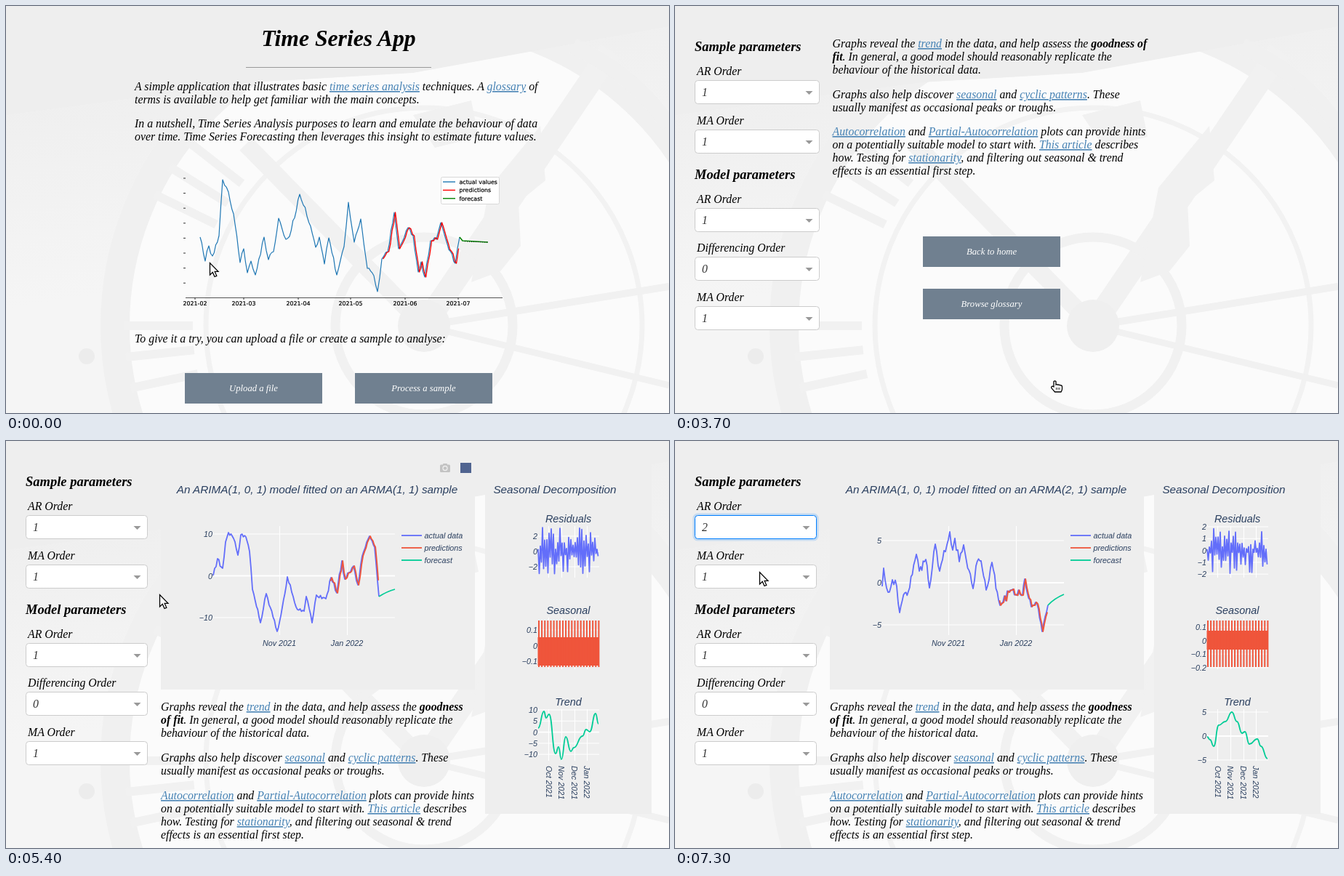
These frames come from a looping animation (912 by 560 pixels, 8 s). An HTML page:

```html
<!DOCTYPE html>
<html lang="en">
<head>
<meta charset="utf-8">
<title>Time Series App</title>
<style>
html, body { margin: 0; width: 100%; height: 100%; overflow: hidden; background: #f8f8f8; }
svg { display: block; width: 912px; height: 560px; font: italic 15.84px "Liberation Serif", serif; }
.title { font-size: 31.68px; font-weight: bold; }
.head { font-size: 18.53px; font-weight: bold; }
.link { fill: #4682b4; text-decoration: underline; }
.bold { font-weight: bold; }
.button { font-size: 12.7px; fill: #fff; }
.value { fill: #333; }
.mid { text-anchor: middle; }
.end { text-anchor: end; }
.plot { font: italic 10.8px "Liberation Sans", sans-serif; fill: #2a3f5f; }
.big { font-size: 15.3px; }
.sub { font-size: 14.4px; }
.mpl { font: 7.9px "DejaVu Sans", sans-serif; stroke: #000; stroke-width: .2px; }
polyline { fill: none; stroke-linejoin: round; }
</style>
</head>
<body>
<svg id="stage" viewBox="0 0 912 560"></svg>
<script>
const LOOP = 8000;
const BLUE = '#636efa', RED = '#ef553b', GREEN = '#00cc96';
const stage = document.getElementById('stage');

// Markup: [link] and *bold*
const rich = s => s.replace(/&/g, '&amp;')
  .replace(/\[(.+?)\]/g, '<tspan class="link">$1</tspan>')
  .replace(/\*(.+?)\*/g, '<tspan class="bold">$1</tspan>');
const text = (x, y, s, cls = '', extra = '') => `<text x="${x}" y="${y}" class="${cls}" ${extra}>${rich(s)}</text>`;
const lines = (x, y, rows) => rows.map((s, i) => text(x, y + 18 * i, s)).join('');
const rect = (x, y, w, h, fill, extra = '') => `<rect x="${x}" y="${y}" width="${w}" height="${h}" fill="${fill}" ${extra}/>`;
const path = (d, stroke, width = 1, extra = '') => `<path d="${d}" fill="none" stroke="${stroke}" stroke-width="${width}" ${extra}/>`;
const shape = (d, fill, extra = '') => `<path d="${d}" fill="${fill}" ${extra}/>`;
const group = (id, body, cls = '') => `<g id="${id}" class="${cls}">${body}</g>`;
const button = (x, y, label) => rect(x, y, 189, 42, '#708090') + text(x + 94.5, y + 25, label, 'button mid');

function random(seed) {
  return () => (seed = seed * 16807 % 2147483647) / 2147483647;
}

// Turning points written as "x,y x,y"
const turns = s => s.split(' ').map(p => p.split(',').map(Number));

// Joins turning points in small steps, with a wobble that fades out at each of them
function series(keys, step, wobble, seed = 1) {
  const rnd = random(seed * 7919), pts = turns(keys), out = [pts[0]];
  for (let i = 1; i < pts.length; i++) {
    const [x0, y0] = pts[i - 1], [x1, y1] = pts[i];
    const n = Math.max(1, Math.round((x1 - x0) / step));
    for (let j = 1; j <= n; j++) {
      const k = j / n, noise = wobble * (2 * rnd() - 1) * Math.sin(Math.PI * k);
      out.push([x0 + (x1 - x0) * k, y0 + (y1 - y0) * k + noise]);
    }
  }
  return out;
}

// A prediction trails the data by one step
const lagged = (pts, from, step) => pts.filter(p => p[0] >= from).slice(0, -1).map(([x, y]) => [x + step, y]);

const trace = (pts, color, width = 1.8) =>
  `<polyline points="${pts.map(p => p.map(v => v.toFixed(1))).join(' ')}" stroke="${color}" stroke-width="${width}"/>`;

function smooth(keys, color) {
  const pts = turns(keys);
  return path(pts.map(([x, y], i) => {
    if (!i) return `M${x} ${y}`;
    const [px, py] = pts[i - 1], mx = (px + x) / 2;
    return `C${mx} ${py} ${mx} ${y} ${x} ${y}`;
  }).join(''), color, 1.8);
}

function background() {
  const [cx, cy] = [575, 440];
  const ray = (deg, r) => {
    const a = deg * Math.PI / 180;
    return `${cx + r * Math.cos(a)} ${cy + r * Math.sin(a)}`;
  };
  const spoke = (x, y, w) => path(`M${cx} ${cy}L${x} ${y}`, '#f1f1f1', w);
  const ring = (r, color, w, fill = 'none') => `<circle cx="${cx}" cy="${cy}" r="${r}" fill="${fill}" stroke="${color}" stroke-width="${w}"/>`;
  let numerals = '';
  for (const middle of [174, 212])
    for (const turn of [-6, 0, 6]) numerals += path(`M${ray(middle + turn, 318)}L${ray(middle + turn, 412)}`, '#f1f1f1', 12);
  return `<defs><linearGradient id="sky" x2=".25" y2="1">
      <stop offset=".15" stop-color="#eee"/><stop offset=".7" stop-color="#f5f5f5"/></linearGradient></defs>`
    + rect(0, 0, 912, 560, 'url(#sky)')
    + ring(425, '#f0f0f0', 40, '#fbfbfb') + ring(300, '#f2f2f2', 7)
    + shape('M0 0H912V28L560 92 340 105 0 150Z', '#eee')
    + numerals
    + spoke(832, 62, 32) + spoke(330, 190, 24) + spoke(912, 386, 10) + spoke(912, 522, 9)
    + ring(122, '#f1f1f1', 13) + ring(36, '#efefef', 0, '#efefef')
    + shape('M560 150L640 130 650 180 590 195ZM665 250L735 165 742 240 705 270 708 330 680 365 640 380Z', '#f1f1f1')
    + path('M780 55Q865 95 912 165', '#f0f0f0', 22)
    + '<circle cx="111" cy="482" r="11" fill="#ececec"/>';
}

function homeChart() {
  const step = 2.42;
  const data = series('267,318 274,351 279,330 284,344 293,316 298,239 306,256 313,286 322,353 327,334 332,367 337,351 343,370 '
    + '355,318 361,349 368,338 375,292 385,321 390,317 404,259 419,303 426,332 431,318 438,355 444,319 455,370 465,331 '
    + '471,270 479,325 488,293 497,361 506,371 511,393 517,348 525,338 534,284 540,334 553,305 560,316 567,366 571,352 '
    + '576,373 584,323 592,321 598,298 609,335 618,354 624,318', step, 4);
  const ticks = [260, 327, 402, 474, 549, 622];
  const key = [['actual values', '#1f77b4'], ['predictions', '#f00'], ['forecast', '#008000']];
  let s = path('M247 401.5H683', '#555');
  for (let i = 0; i < 8; i++) s += path(`M244 ${237 + i * 20.6}h3`, '#333');
  ticks.forEach((x, i) => s += path(`M${x} 401v3`, '#333') + text(x, 412, `2021-0${i + 2}`, 'mpl mid'));
  s += trace(data, '#1f77b4', 1.2) + trace(lagged(data, 517, 1.6), '#f00', 1.3)
    + path('M624 318L628 323 663 325', '#008000', 1.5) + path('M631 324L663 325', '#222', 1, 'stroke-dasharray="1 2"')
    + rect(598.5, 235.5, 80, 37, '#fff', 'rx="2" stroke="#d8d8d8"');
  key.forEach(([label, color], i) => {
    const y = 242 + i * 11.4;
    s += path(`M601 ${y}h17`, color, 1.4) + text(623.5, y + 3, label, 'mpl');
  });
  return s;
}

function home() {
  return text(457.5, 55, 'Time Series App', 'title mid')
    + path('M330 84.5H585', '#999')
    + lines(177, 116, ['A simple application that illustrates basic [time series analysis] techniques. A [glossary] of',
      'terms is available to help get familiar with the main concepts.'])
    + lines(177, 167, ['In a nutshell, Time Series Analysis purposes to learn and emulate the behaviour of data',
      'over time. Time Series Forecasting then leverages this insight to estimate future values.'])
    + homeChart()
    + text(177, 463, 'To give it a try, you can upload a file or create a sample to analyse:')
    + button(246, 505, 'Upload a file') + button(480, 505, 'Process a sample');
}

const caret = (x, y, up) => shape(`M${x} ${y}h10l-5 ${up ? -5 : 5}z`, '#999');

function form(width) {
  const fields = [['AR Order', 1], ['MA Order', 1], ['AR Order', 1], ['Differencing Order', 0], ['MA Order', 1]];
  return text(27, 62, 'Sample parameters', 'head') + text(27, 238, 'Model parameters', 'head')
    + fields.map(([label, value], i) => {
      const y = Math.round(102 + 67.8 * i + (i > 1 ? 40 : 0)) + .5;
      return text(30, y - 7.5, label) + rect(27.5, y, width, 32, '#fff', 'rx="4" stroke="#ccc"')
        + text(37, y + 21.5, `${value}`, 'value') + caret(width + 8.5, y + 14.5);
    }).join('');
}

const notes = (x, tops, first) => lines(x, tops[0], first)
  + lines(x, tops[1], ['Graphs also help discover [seasonal] and [cyclic patterns]. These', 'usually manifest as occasional peaks or troughs.'])
  + lines(x, tops[2], ['[Autocorrelation] and [Partial-Autocorrelation] plots can provide hints',
    'on a potentially suitable model to start with. [This article] describes',
    'how. Testing for [stationarity], and filtering out seasonal & trend', 'effects is an essential first step.']);

// Evenly spaced horizontal grid with labels
const axis = (x0, x1, top, gap, labels) => labels.map((label, i) => {
  const y = top + gap * i;
  return path(`M${x0} ${y}H${x1}`, '#fff', label === '0' ? 1.8 : 1) + text(x0 - 1, y + 4, label, 'end');
}).join('');
const columns = (xs, y0, y1) => xs.map(x => path(`M${x}.5 ${y0}V${y1}`, '#fff')).join('');

function mainChart({ order, grid, keys, wobble, forecast }) {
  const data = series(keys, 2, wobble, 3);
  const legend = [['actual data', BLUE], ['predictions', RED], ['forecast', GREEN]];
  return text(428, 72, `An ARIMA(1, 0, 1) model fitted on an ARMA(${order}, 1) sample`, 'big mid')
    + columns([376, 469], 117, 267) + axis(285, 535, ...grid)
    + text(376, 282, 'Nov 2021', 'mid') + text(469, 282, 'Jan 2022', 'mid')
    + trace(data, BLUE) + trace(lagged(data, 445, 1.2), RED) + path(forecast, GREEN, 1.8)
    + legend.map(([label, color], i) => path(`M544 ${130 + 17 * i}h28`, color, 1.8) + text(575.5, 134 + 17 * i, label)).join('');
}

function residuals(seed) {
  const rnd = random(seed), pts = [];
  for (let i = 0; i < 56; i++) pts.push([732 + i * 1.5, 151 + (i % 2 ? 1 : -1) * (2 + 30 * rnd() ** 1.5)]);
  return trace(pts, BLUE);
}

function seasonal(bandTop, bandEnd) {
  let spikes = '';
  for (let x = 733; x < 816; x += 4.12) spikes += `M${x} 247V311`;
  return rect(731.5, bandTop, 84.5, bandEnd - bandTop, RED) + path(spikes, RED, 2);
}

function decomposition({ seed, noiseGrid, seasonGrid, band, trendGrid, trend }) {
  const xs = [746, 764, 782, 799];
  return text(755, 72, 'Seasonal Decomposition', 'big mid')
    + ['Residuals', 'Seasonal', 'Trend'].map((s, i) => text(773.5, 112 + 126 * i, s, 'sub mid')).join('')
    + [117, 243, 369].map(y => columns(xs, y, y + 71)).join('')
    + axis(732, 816, ...noiseGrid) + residuals(seed)
    + axis(732, 816, ...seasonGrid) + seasonal(...band)
    + axis(732, 816, ...trendGrid) + smooth(trend, GREEN)
    + ['Oct 2021', 'Nov 2021', 'Dec 2021', 'Jan 2022'].map((s, i) =>
      text(0, 0, s, '', `transform="translate(${742.5 + 17.6 * i} 447) rotate(90)"`)).join('');
}

const firstSample = {
  order: 1, wobble: 4, grid: [128, 57.5, ['10', '0', '−10']],
  keys: '285,185 291,162 298,175 302,139 306,126 313,134 319,157 323,129 330,132 335,152 339,204 350,250 358,210 373,262 380,229 '
    + '387,187 395,214 401,232 410,234 413,214 421,250 427,212 440,217 447,188 455,209 462,165 466,190 478,172 484,198 '
    + '490,158 500,131 507,146 513,214',
  forecast: 'M513 214Q524 207 535 204',
  seed: 4242, noiseGrid: [131, 21, ['2', '0', '−2']],
  seasonGrid: [260, 21.5, ['0.1', '0', '−0.1']], band: [270, 309],
  trendGrid: [370, 15.3, ['10', '5', '0', '−5', '−10']],
  trend: '732,395 740,372 743,381 747,376 756,430 760,421 764,438 770,407 777,427 781,422 793,406 798,397 803,400 811,375 815,389'
};
const secondSample = {
  order: 2, wobble: 7, grid: [137, 58, ['5', '0', '−5']],
  keys: '285,200 287,175 293,208 299,191 305,200 309,236 316,209 321,207 332,156 336,179 345,163 350,202 358,142 364,179 '
    + '378,125 382,150 385,134 391,166 397,143 410,203 414,172 421,165 428,205 436,167 447,226 463,205 478,212 481,190 '
    + '490,228 498,224 505,262 513,226',
  forecast: 'M513 226Q521 217 535 211',
  seed: 977, noiseGrid: [118, 16.3, ['2', '1', '0', '−1', '−2']],
  seasonGrid: [256, 18.6, ['0.1', '0', '−0.1', '−0.2']], band: [261, 287],
  trendGrid: [373, 33, ['5', '0', '−5']],
  trend: '732,407 736,411 741,420 748,391 757,386 766,373 773,386 780,402 784,400 790,417 801,410 806,420 815,437'
};

function menu() {
  return shape('M27.5 134.5V106.5q0-4 4-4H190.5q4 0 4 4V257.5q0 4-4 4H31.5q-4 0-4-4Z', '#fff', 'stroke="#c4c4c4"')
    + path('M28 134.5H194', '#e0e6ea')
    + rect(28, 135, 166, 31.5, '#e3f2ff', 'id="hover"')
    + text(37, 124, '1', 'value') + caret(175.5, 122, true)
    + [1, 2, 3, 4].map((n, i) => text(35, 156 + 31.3 * i, `${n}`, n === 1 ? 'bold' : '')).join('');
}

const focusBox = rect(26, 101, 170, 35, 'none', 'rx="5" stroke="#007eff" stroke-opacity=".18" stroke-width="3"')
  + rect(27.5, 102.5, 167, 32, '#fff', 'rx="4" stroke="#007eff"')
  + text(37, 124, '2', 'value') + caret(175.5, 117);

const modebar = rect(597, 32.5, 14, 10.5, '#c3c3c3', 'rx="1.5"') + rect(601, 31, 6, 3, '#c3c3c3', 'rx="1"')
  + '<circle cx="604" cy="37.5" r="3" fill="#c3c3c3" stroke="#eee" stroke-width="1.3"/>' + rect(625, 30, 15, 14, '#506490');

const outline = 'stroke="#000" stroke-width="1.3"';
const arrow = shape('M.5 .5V17L4.3 13.4 7 19.5 9.8 18.3 7.2 12.4H12Z', '#fff', outline);
const hand = shape('M4 9V1.7q1.5-1.7 3 0V6q1-1 2.3 .3 1-.8 2.2 .3 1-.6 2 .4 1.8-.2 2 1.5V12q0 2-1.5 4H5.5Q3 13 .8 10.6 .3 8.3 2.5 8.2Z', '#fff', outline)
  + path('M7.5 10v3M9.8 10v3M12 10v3', '#000', .8);

stage.innerHTML = background()
  + group('home', home())
  + group('plain', form(171)
    + notes(216.5, [57, 127, 178], ['Graphs reveal the [trend] in the data, and help assess the *goodness of*',
      '*fit*. In general, a good model should reasonably replicate the', 'behaviour of the historical data.'])
    + button(341, 317, 'Back to home') + button(341, 389, 'Browse glossary'))
  + group('report', rect(213, 27, 432, 315, '#eee') + rect(659, 27, 229, 486, '#eee') + form(167)
    + notes(213, [371, 441, 493], ['Graphs reveal the [trend] in the data, and help assess the *goodness*',
      '*of fit*. In general, a good model should reasonably replicate the', 'behaviour of the historical data.']))
  + group('firstMain', mainChart(firstSample), 'plot') + group('firstParts', decomposition(firstSample), 'plot')
  + group('secondMain', mainChart(secondSample), 'plot') + group('secondParts', decomposition(secondSample), 'plot')
  + group('modebar', modebar) + group('menu', menu()) + group('focus', focusBox)
  + group('arrow', arrow) + group('hand', hand);

// Visible spans in ms
const spans = {
  home: [0, 3700], plain: [3700, 4400], report: [4400, LOOP],
  firstMain: [4600, 7200], secondMain: [7200, LOOP], firstParts: [4400, 7100], secondParts: [7100, LOOP],
  modebar: [5200, 5500], menu: [6100, 6900], focus: [6900, LOOP], hand: [3400, 5000]
};
// Pointer moves: start, end, target; the pointer rests in between
const moves = [
  [1400, 2200, 433, 396], [2200, 2300, 418, 397], [2300, 2400, 441, 409], [3000, 3100, 516, 502], [3300, 3500, 517, 515],
  [4900, 5400, 211, 211], [5400, 5700, 84, 112], [5700, 5800, 100, 114], [6200, 6600, 116, 180]
];
const parts = Object.fromEntries([...Object.keys(spans), 'arrow', 'hover'].map(id => [id, document.getElementById(id)]));
const show = (id, on) => { parts[id].style.display = on ? '' : 'none'; };

function pointer(t) {
  let x = 280, y = 353;
  for (const [from, to, tx, ty] of moves) {
    const k = Math.min(1, Math.max(0, (t - from) / (to - from)));
    x += (tx - x) * k;
    y += (ty - y) * k;
  }
  return [Math.round(x), Math.round(y)];
}

function render(now) {
  const t = Math.floor(now % LOOP / 100) * 100;
  for (const [id, [from, to]] of Object.entries(spans)) show(id, t >= from && t < to);
  const [x, y] = pointer(t);
  const onLink = t >= spans.hand[0] && t < spans.hand[1];
  show('arrow', !onLink);
  parts[onLink ? 'hand' : 'arrow'].setAttribute('transform', `translate(${x} ${y})`);
  parts.hover.setAttribute('y', t >= 6300 && y > 146 ? 166.3 : 135);
}

const start = performance.now();
function tick() {
  render(performance.now() - start);
  requestAnimationFrame(tick);
}
tick();
</script>
</body>
</html>
```
